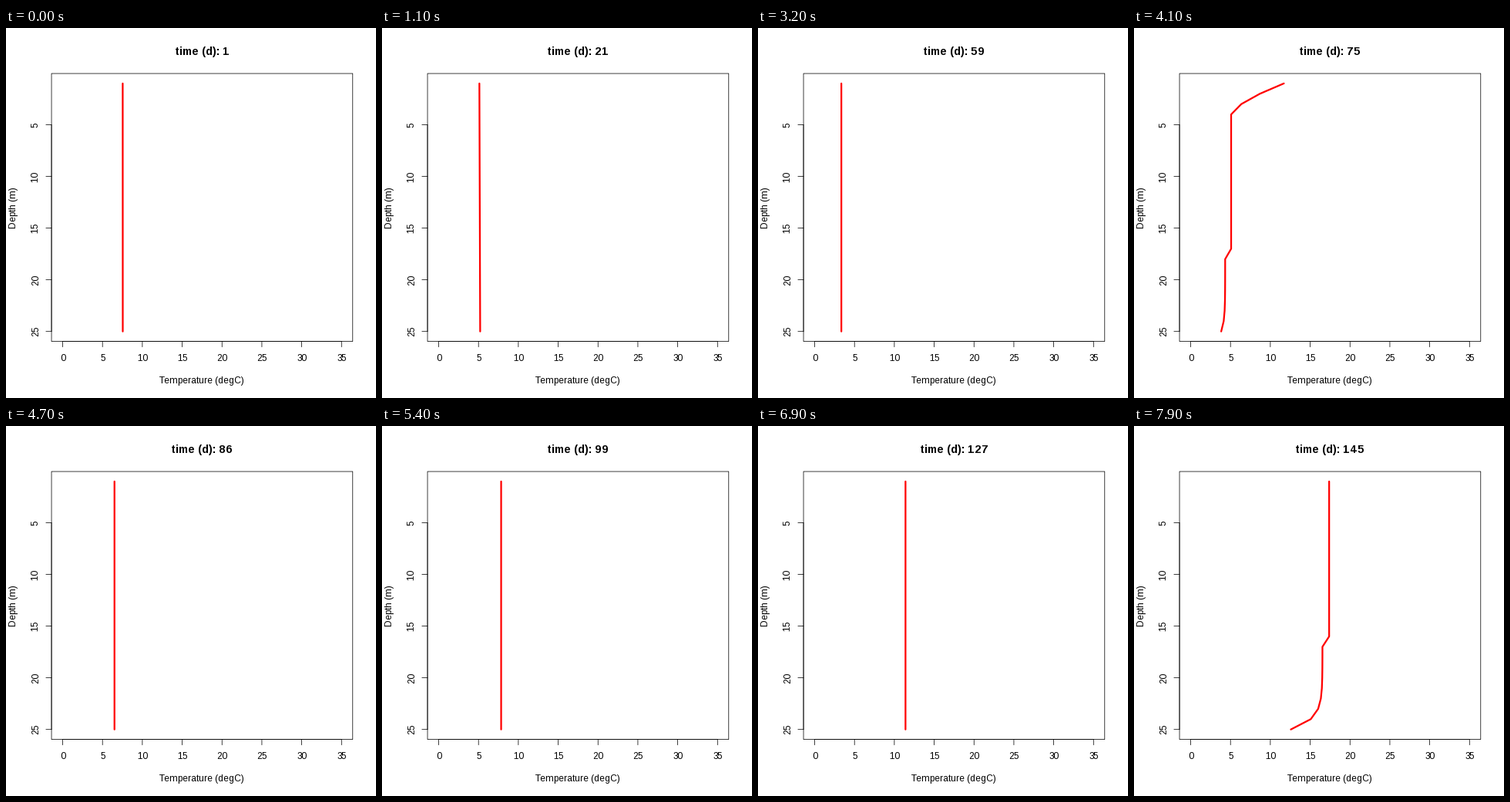
Animation, 480 px wide and 480 px high, one loop 8000 ms. Source, as a matplotlib script:

```python
import numpy as np
import matplotlib.pyplot as plt
from matplotlib.animation import FuncAnimation
from matplotlib.patches import Rectangle

SIZE, DPI = 480, 72
FRAMES, INTERVAL = 80, 100
LEFT, RIGHT, TOP, BOTTOM = 59.04, 449.76, 59.04, 406.56
TICK = 7.2
THIN, THICK = 0.75, 2.25

plt.rcParams.update({
    "font.family": "Liberation Sans",
    "font.size": 12,
    "text.hinting": "force_autohint",
    "text.hinting_factor": 1,
})

DEPTHS = np.arange(1, 26)

# turning points of the mixed-layer temperature
BASE_AT = [0, 9, 11, 18, 23, 28, 36, 41, 45, 54, 69, 79]
BASE = [7.54, 5.74, 5.16, 2.36, 3.22, 3.1, 3.6, 5.08, 6.12, 7.84, 11.4, 17.38]

# layered spells: peak, half-length, depth of the step,
# step size, extra change at the bottom, surface warming
SPELLS = [
    (23, 5, 19.5, 0.37, 0.0, 0.0),
    (41, 4, 17.5, -0.75, -0.5, 6.62),
    (63, 6, 17.5, -0.8, -1.0, 1.2),
    (79, 10, 16.5, -0.84, -3.97, 0.0),
]


def pulse(i, peak, half):
    return max(0, 1 - abs(i - peak) / half)


def profile(i):
    temp = np.interp(i, BASE_AT, BASE) + np.zeros(len(DEPTHS))
    temp += 0.1 * pulse(i, 11, 12) * (DEPTHS - 13) / 24
    skin = np.clip(1 - (DEPTHS - 1) / 3, 0, 1) ** 1.5
    tail = np.exp(DEPTHS - 25.0)
    for peak, half, depth, step, bottom, surface in SPELLS:
        shape = step * (DEPTHS > depth) + bottom * tail + surface * skin
        temp += pulse(i, peak, half) * shape
    return temp


def day(i):
    return int(1 + i * 364 / 199)


def x_px(temp):
    return LEFT + (RIGHT - LEFT) * (temp / 35 + 0.04) / 1.08


def y_px(depth):
    return TOP + (BOTTOM - TOP) * ((depth - 1) / 24 + 0.04) / 1.08


fig = plt.figure(figsize=(SIZE / DPI, SIZE / DPI), dpi=DPI, facecolor="white")
ax = fig.add_axes([0, 0, 1, 1])
ax.set_xlim(0, SIZE)
ax.set_ylim(SIZE, 0)
ax.axis("off")


def stroke(xs, ys, color="black", width=THIN, z=3):
    line, = ax.plot(xs, ys, color=color, lw=width, zorder=z, snap=False,
                    solid_capstyle="round", solid_joinstyle="round")
    return line


def label(x, y, text, turn=0, **style):
    return ax.text(x, y, text, ha="center", va="baseline", rotation=turn,
                   rotation_mode="anchor", **style)


curve = stroke([], [], "red", THICK, 2)

ax.add_patch(Rectangle((LEFT, TOP), RIGHT - LEFT, BOTTOM - TOP, fill=False,
                       lw=THIN, joinstyle="round", snap=False, zorder=3))
stroke([x_px(0), x_px(35)], [BOTTOM, BOTTOM])
stroke([LEFT, LEFT], [y_px(5), y_px(25)])

for t in range(0, 36, 5):
    stroke([x_px(t)] * 2, [BOTTOM, BOTTOM + TICK])
    label(x_px(t), 432, str(t))
for d in range(5, 26, 5):
    stroke([LEFT - TICK, LEFT], [y_px(d)] * 2)
    label(41.8, y_px(d), str(d), 90)

mid_x, mid_y = (LEFT + RIGHT) / 2, (TOP + BOTTOM) / 2
label(mid_x, 461.4, "Temperature (degC)")
label(13.4, mid_y, "Depth (m)", 90)
title = label(mid_x, 35, "", fontsize=14.4, fontweight="bold")


def update(i):
    curve.set_data(x_px(profile(i)), y_px(DEPTHS))
    title.set_text(f"time (d): {day(i)}")
    return curve, title


anim = FuncAnimation(fig, update, frames=FRAMES, interval=INTERVAL,
                     repeat=True, repeat_delay=0)
plt.show()
```
